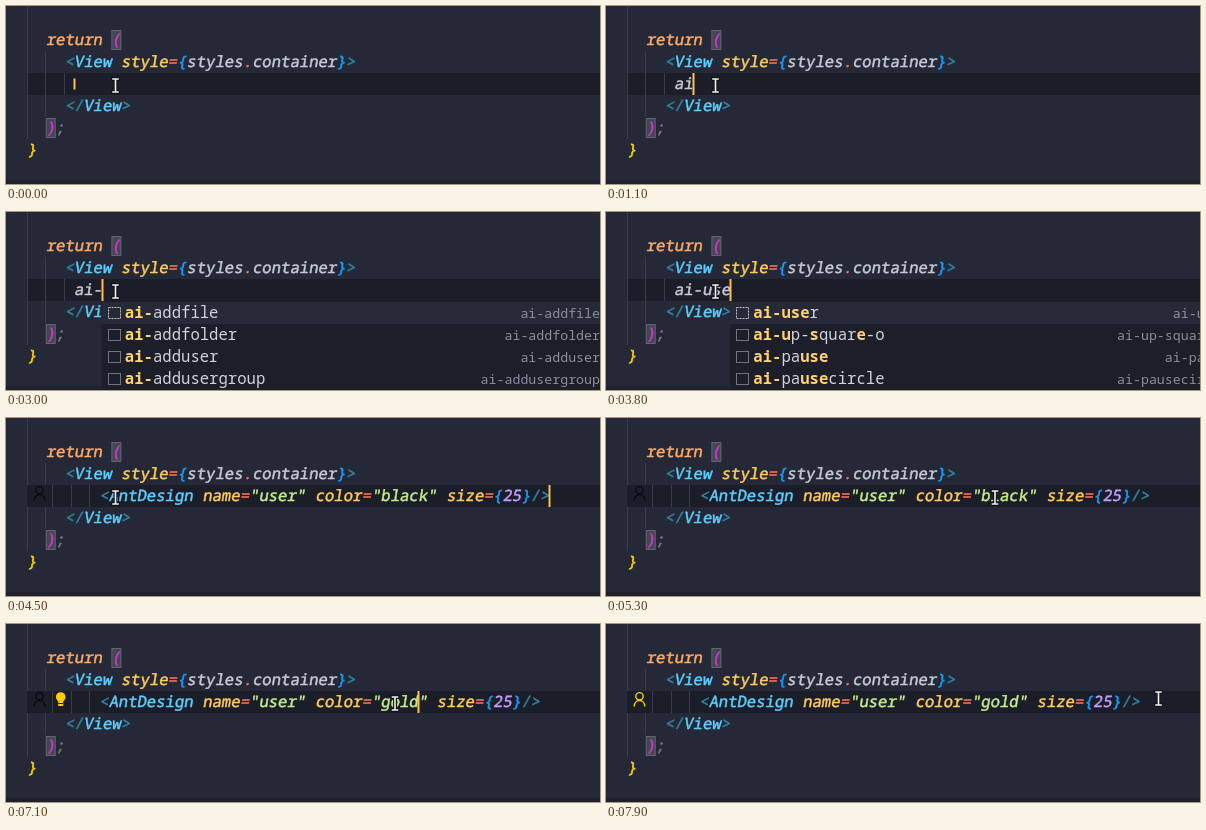
These frames come from a looping animation (594x178 px, 8000 ms). An HTML page with a canvas:

```html
<!DOCTYPE html>
<html lang="en">
<head>
<meta charset="utf-8">
<title>Icon snippet in an editor</title>
<style>
  html, body { margin: 0; width: 100%; height: 100%; overflow: hidden; background: #252836; }
  canvas { display: block; width: 594px; height: 178px; }
</style>
</head>
<body>
<canvas id="stage"></canvas>
<script>
const W = 594, H = 178, LOOP = 8000, STEP = 100;
const LEFT = 21.2, CHAR = 9.375, LINE = 22, TOP = 23;
const SLANT = 0.16, WEIGHT = 0.5;
const FAMILY = '"Noto Sans Mono", "DejaVu Sans Mono", monospace';
const PLAIN = `15.625px ${FAMILY}`;
const BOLD = `bold 15.625px ${FAMILY}`;
const SMALL = `13.28px ${FAMILY}`;
const C = {
  bg: '#252836', line: '#1b1d28', popup: '#1c1e2a', chosen: '#262938',
  guide: '#393c4a', match: '#444754', select: '#3c435f', strip: '#1f212d',
  key: '#ffab66', tag: '#5ccfff', punct: '#2f83a0', attr: '#ffcc5c',
  op: '#ef7358', text: '#c5cad6', string: '#c3ee8d', number: '#c49cff',
  gold: '#ffd700', pink: '#d634d2', blue: '#179fff', dim: '#737887', caret: '#ffc04d'
};

const canvas = document.getElementById('stage');
const ctx = canvas.getContext('2d');
const ratio = window.devicePixelRatio || 1;
canvas.width = W * ratio;
canvas.height = H * ratio;

const colX = col => LEFT + col * CHAR;
const rowY = row => TOP + row * LINE;
const smooth = p => p * p * (3 - 2 * p);
const clamp = p => Math.max(0, Math.min(1, p));

function box(x, y, w, h, color) {
  ctx.fillStyle = color;
  ctx.fillRect(x, y, w, h);
}

function write(str, x, y, color, font, align = 'left') {
  ctx.font = font;
  ctx.textAlign = align;
  ctx.fillStyle = color;
  ctx.fillText(str, x, y);
}

// Gently slanted, medium weight lettering
function writeCode(str, x, y, color) {
  ctx.save();
  ctx.transform(1, 0, -SLANT, 1, x, y);
  write(str, 0, 0, color, PLAIN);
  ctx.strokeStyle = color;
  ctx.lineWidth = WEIGHT;
  ctx.lineJoin = 'round';
  ctx.strokeText(str, 0, 0);
  ctx.restore();
}

// parts: [text, colour] pairs laid out on the character grid
function code(row, x, parts) {
  for (const [str, color] of parts) {
    writeCode(str, x, rowY(row) + 16, C[color]);
    x += str.length * CHAR;
  }
}

// Typed text by time; blink restarts half a second after each key
const typed = [[0, ''], [1000, 'a'], [1100, 'ai'], [2500, 'ai-'],
  [3200, 'ai-u'], [3500, 'ai-us'], [3700, 'ai-use'], [4000, 'ai-user']];
const colors = [[4300, 'black'], [6100, 'g'], [6400, 'go'], [6600, 'gol'], [6800, 'gold']];
const INSERT = 4300, PICK = 5700, RETYPE = 6100, SAVE = 7300;
const ICON_W = 25.2;
const TAG_X = colX(5) + ICON_W;

const latest = (list, t) => list.filter(item => item[0] <= t).pop();

// Each * pair wraps the matched letters
const menus = [
  [1600, 2500, 86, ['*ai-*addfile', '*ai-*addfolder', '*ai-*adduser', '*ai-*addusergroup']],
  [2700, 3200, 95.5, ['*ai-*addfile', '*ai-*addfolder', '*ai-*adduser', '*ai-*addusergroup']],
  [3200, 3500, 105, ['*ai-u*p', '*ai-u*ser', '*ai-u*pload', '*ai-u*pcircle']],
  [3500, 3700, 114.5, ['*ai-us*er', '*ai-u*p-*s*quare-o', '*ai-*pa*us*e', '*ai-*pa*us*ecircle']],
  [3700, 4000, 124, ['*ai-use*r', '*ai-u*p-*s*quar*e*-o', '*ai-*pa*use*', '*ai-*pa*use*circle']],
  [4000, INSERT, 133, ['*ai-user*', '*ai-*add*user*', '*ai-*delete*user*', '*ai-*add*user*group']]
];

function drawMenu(left, items) {
  box(left, 89, 510, H - 89, C.popup);
  box(left, 90, 509, LINE, C.chosen);
  box(left + 499, 90, 10, 20, '#3a3d4e');
  items.forEach((item, i) => {
    const y = 90 + i * LINE;
    ctx.strokeStyle = i ? '#6f7382' : '#c3c6cf';
    ctx.lineWidth = 1;
    ctx.setLineDash(i ? [] : [2, 1]);
    ctx.strokeRect(Math.round(left) + 6.5, y + 5.5, 12, 11);
    ctx.setLineDash([]);
    let x = left + 23.3;
    item.split('*').forEach((part, n) => {
      write(part, x, y + 15.5, n % 2 ? '#ffd173' : '#d0d3dc', n % 2 ? BOLD : PLAIN);
      x += part.length * CHAR;
    });
    write(item.replaceAll('*', ''), left + 498.5, y + 15.5, '#8b8f9d', SMALL, 'right');
  });
}

function drawUser(color) {
  ctx.strokeStyle = color;
  ctx.lineWidth = 1.4;
  ctx.beginPath();
  ctx.arc(33.5, 72.3, 3.7, 0, 7);
  ctx.moveTo(28.2, 82.5);
  ctx.bezierCurveTo(28.5, 74.5, 38.5, 74.5, 38.8, 82.5);
  ctx.stroke();
}

function drawBulb() {
  ctx.fillStyle = '#ffcc00';
  ctx.beginPath();
  ctx.arc(54.7, 73, 4.8, 0, 7);
  ctx.fill();
  box(52.2, 76, 5, 6, '#ffcc00');
  box(52.2, 79, 5, 1, C.line);
}

function drawMouse(x, y) {
  for (const [color, width] of [['#11131a', 3.8], ['#f2f2f2', 1.6]]) {
    ctx.strokeStyle = color;
    ctx.lineWidth = width;
    ctx.lineCap = 'square';
    ctx.beginPath();
    ctx.moveTo(x, y - 6);
    ctx.lineTo(x, y + 6);
    for (const end of [-6.5, 6.5]) {
      ctx.moveTo(x - 2.5, y + end);
      ctx.lineTo(x + 2.5, y + end);
    }
    ctx.stroke();
  }
  ctx.lineCap = 'butt';
}

function mouseAt(t) {
  const out = smooth(clamp((t - 4500) / 700));
  const away = smooth(clamp((t - 7100) / 700));
  return [109.5 + 279.5 * out + 163.5 * away, 79.5 - 5 * away + 10 * Math.sin(Math.PI * away)];
}

function drawCaret(x, t, lastKey) {
  const age = lastKey ? t - lastKey - 500 : t + 250;
  let size = 1;
  if (age > 0) {
    const phase = age % 1000;
    const p = (phase < 500 ? phase : 1000 - phase) / 500;
    size = 1 - smooth(clamp((p - 0.2) / 0.6));
  }
  const h = LINE * size;
  if (h > 0.3) box(Math.round(x) - 0.5, 78 - h / 2, 2, h, C.caret);
}

function drawIcon(t, color) {
  const parts = [['<', 'punct'], ['AntDesign', 'tag'], [' name', 'attr'], ['=', 'op'],
    ['"user"', 'string'], [' color', 'attr'], ['=', 'op'], [`"${color}"`, 'string'],
    [' size', 'attr'], ['=', 'op'], ['{', 'blue'], ['25', 'number'], ['}', 'blue'], ['/>', 'punct']];
  code(2, TAG_X, parts);
  drawUser(t >= SAVE ? '#f5cf16' : '#090a0e');
  if (t >= 6200 && t < SAVE) drawBulb();
}

// Indent guides; the inline icon pushes those of its own row aside
function drawGuides(shift) {
  const guide = (col, row, dx = 0) => box(Math.floor(colX(col) + dx), rowY(row), 1, LINE, C.guide);
  for (let row = -2; row < 5; row++) {
    const depth = row === 2 ? 5 : row === 1 || row === 3 ? 4 : 2;
    for (let col = 0; col < depth; col += 2) guide(col, row, row === 2 ? shift : 0);
  }
}

function draw(t) {
  ctx.setTransform(ratio, 0, 0, ratio, 0, 0);
  const inserted = t >= INSERT;
  const selecting = t >= PICK && t < RETYPE;

  box(0, 0, W, H, C.bg);
  box(0, 174, W, 4, C.strip);
  if (!selecting) {
    box(21, rowY(2), W - 21, LINE, C.line);
    for (const [col, row] of [[9, 0], [2, 4]]) {
      box(colX(col) - 0.2, rowY(row) + 1, 10, 20, '#626572');
      box(colX(col) + 0.8, rowY(row) + 2, 8, 18, C.match);
    }
  }
  if (selecting) box(TAG_X + 30 * CHAR, rowY(2), 5 * CHAR, LINE, C.select);
  drawGuides(inserted ? ICON_W : 0);

  code(0, colX(2), [['return', 'key'], [' (', 'pink']]);
  code(1, colX(4), [['<', 'punct'], ['View', 'tag'], [' style', 'attr'], ['=', 'op'],
    ['{', 'blue'], ['styles', 'text'], ['.', 'op'], ['container', 'text'], ['}', 'blue'], ['>', 'punct']]);
  code(3, colX(4), [['</', 'punct'], ['View', 'tag'], ['>', 'punct']]);
  code(4, colX(2), [[')', 'pink'], [';', 'dim']]);
  code(5, colX(0), [['}', 'gold']]);

  if (inserted) {
    const [key, color] = latest(colors, t);
    drawIcon(t, color);
    const col = t < PICK ? 48 : 30 + color.length;
    drawCaret(TAG_X + col * CHAR, t, selecting ? PICK : key);
  } else {
    const [key, str] = latest(typed, t);
    code(2, colX(5), [[str, 'text']]);
    drawCaret(colX(5 + str.length), t, key);
  }

  const menu = menus.find(([from, to]) => t >= from && t < to);
  if (menu) drawMenu(menu[2], menu[3]);
  drawMouse(...mouseAt(t));
}

const start = performance.now();
function tick() {
  const t = (performance.now() - start) % LOOP;
  draw(Math.floor(t / STEP) * STEP);
  requestAnimationFrame(tick);
}
tick();
</script>
</body>
</html>
```
